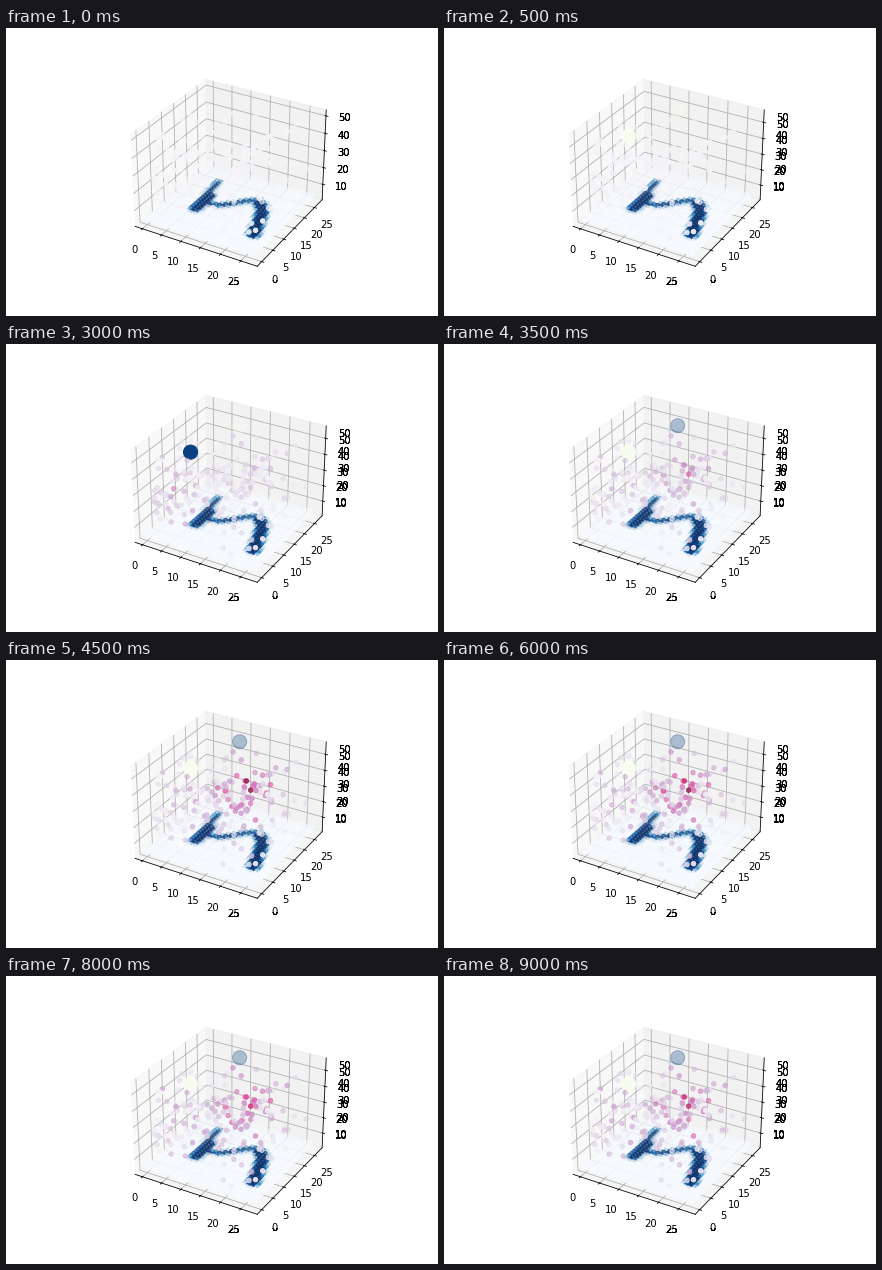
These frames come from a looping animation (432x288 px, 9.5 s). A matplotlib script:

```python
import numpy as np
import matplotlib.pyplot as plt
from matplotlib.animation import FuncAnimation

W, H, DPI = 432, 288, 72
FRAMES, STEP = 19, 500
Z_IN, Z_HIDDEN, Z_OUT = 4, 50, 54
rng = np.random.default_rng(11)

plt.rcParams.update({"font.family": "DejaVu Sans", "font.size": 10})
fig = plt.figure(figsize=(W / DPI, H / DPI), dpi=DPI, facecolor="white")
fig.subplots_adjust(left=.125, right=.9, bottom=.125, top=.88)


def padded(lo, hi):
    """Data range with a 5% margin plus the 1/48 gap to the panes."""
    m = (hi - lo) * .05
    gap = (hi - lo + 2 * m) / 48
    return lo - m - gap, hi + m + gap


def stroke(points, radius):
    """Soft 28x28 coverage of a polyline given in (row, column)."""
    r, c = np.mgrid[:28, :28]
    best = np.full((28, 28), 99.)
    for (r0, c0), (r1, c1) in zip(points, points[1:]):
        dr, dc = r1 - r0, c1 - c0
        t = np.clip(((r - r0) * dr + (c - c0) * dc) / (dr * dr + dc * dc), 0, 1)
        best = np.minimum(best, np.hypot(r - r0 - t * dr, c - c0 - t * dc))
    return np.clip((radius + .6 - best) / 1.1, 0, 1)


digit = np.maximum.reduce([
    stroke([(7.2, 9), (7, 15.5)], 1.5),
    stroke([(6.2, 15), (5.6, 21.5)], .8),
    stroke([(8, 12), (11, 12.7), (13, 14.5), (16, 18), (18, 19)], .8),
    stroke([(18.5, 18), (20.5, 16), (22, 11.5), (23.6, 6)], 1.5),
])

# Hidden layer: a uniform cloud, two clusters and a few leading cells.
EARLY, LATE = np.array([3, 5, 23]), np.array([15, 16, 33])
leaders = np.array([(5, 10.4, 34), (2, 8.2, 24.5), (10.4, 16.6, 29),
                    (15.8, 16.6, 39), (16.9, 16.6, 34), (10.6, 19.7, 50)])
cells = np.vstack([
    rng.uniform((0, 0, 7), (27, 27, Z_HIDDEN), (140, 3)),
    rng.normal(EARLY, (3, 4, 5), (22, 3)),
    rng.normal(LATE, (4, 4, 5), (24, 3)),
    leaders])
cells = np.clip(cells, (0, 0, 7), (27, 27, Z_HIDDEN))
N = len(cells)
strength = rng.uniform(.3, .75, N)
strength[-len(leaders):] = 1
ambient = .3 * rng.random(N) ** 1.5
phase = rng.uniform(0, 2 * np.pi, N)


def nearness(focus):
    offset = (cells - focus) / (7, 7, 11)
    return strength * np.exp(-.5 * (offset ** 2).sum(axis=1))


near_early, near_late = nearness(EARLY), nearness(LATE)
outputs_at = np.array([(8, 6, Z_OUT), (11, 22, Z_OUT)])


def box(z_top):
    ax = fig.add_subplot(projection="3d", computed_zorder=False)
    ax.set_xticks(range(0, 26, 5))
    ax.set_yticks(range(0, 26, 5))
    ax.set_zticks(range(10, 51, 10))
    frame(ax, z_top)
    return ax


def frame(ax, z_top):
    ax.set(xlim=padded(0, 27), ylim=padded(0, 27), zlim=padded(Z_IN, z_top))


def fill(ax, z_top):
    r, c = np.mgrid[:28, :28]
    ax.scatter(r.ravel(), c.ravel(), Z_IN, c=digit.ravel(), cmap="Blues",
               vmin=0, vmax=1, zorder=2)
    hidden = ax.scatter(*cells.T, c=np.zeros(N), cmap="PuRd", vmin=0, vmax=1,
                        zorder=4)
    out = ax.scatter(*outputs_at.T, s=200, c=[0, 0], cmap="GnBu",
                     vmin=0, vmax=1, zorder=3, visible=z_top == Z_OUT)
    frame(ax, z_top)
    return hidden, out


# Stacked boxes: labels outside the white patch show through and thicken.
before = [box(Z_HIDDEN) for _ in range(3)]
fill(before[-1], Z_HIDDEN)
after = [box(Z_OUT) for _ in range(3)]
hidden, out = fill(after[-1], Z_OUT)


def draw(i):
    for ax in after:
        ax.set_visible(i > 0)
    early = np.exp(-((i - 4) / 1.8) ** 2)
    rise = np.clip((i - 5) / 4, 0, 1)
    late = rise * rise * (3 - 2 * rise) * (1 - .03 * max(i - 9, 0))
    glow = np.clip((i - 1) / 3, 0, 1) * (.5 + .5 * i / FRAMES)
    flicker = .88 + .12 * np.sin(phase + 1.3 * i)
    level = flicker * (early * near_early + late * near_late) + glow * ambient
    hidden.set_array(np.clip(level, 0, 1))
    # The first output fires once; the second then blinks and stays on.
    out.set_array(np.array([i == 6, i > 6 and i not in (8, 11, 13)], float))
    return []


anim = FuncAnimation(fig, draw, frames=FRAMES, interval=STEP,
                     init_func=lambda: draw(0), repeat=True, repeat_delay=0)
plt.show()
```
